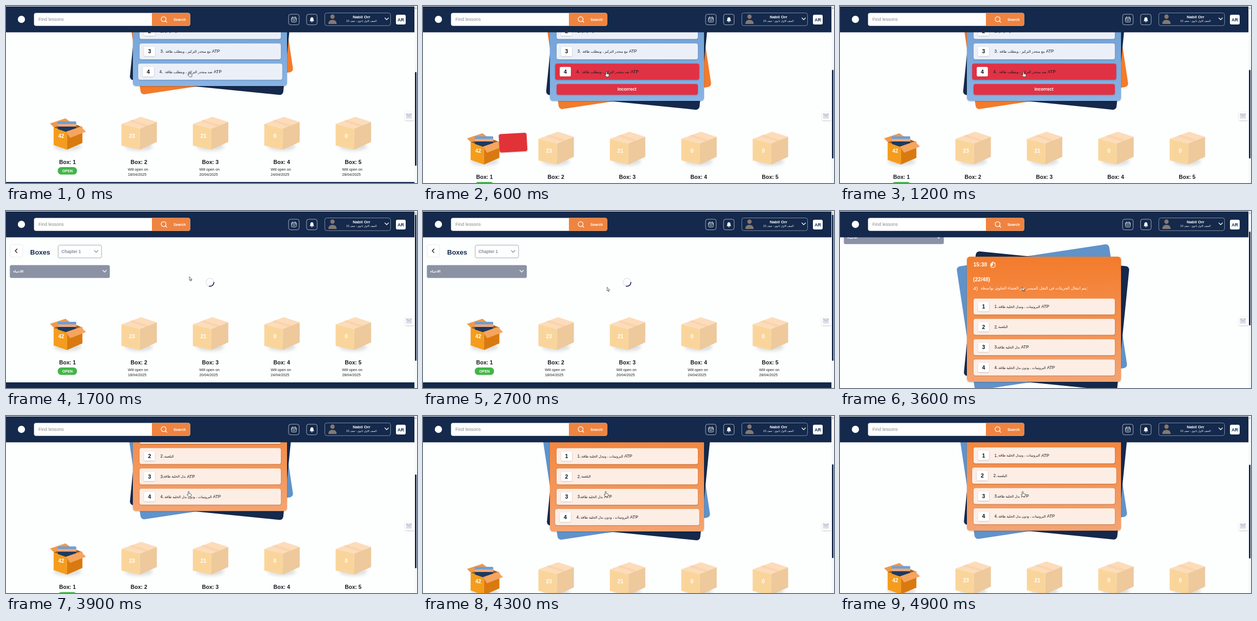
An HTML page for the animation above (5 s loop, 800 by 345 pixels).

```html
<!DOCTYPE html>
<html lang="en">
<head>
<meta charset="utf-8">
<title>Question boxes</title>
<style>
html, body { margin: 0; width: 100%; height: 100%; overflow: hidden; background: #fdfefe; }
svg { display: block; width: 800px; height: 345px; font-family: "Liberation Sans", Arial, "DejaVu Sans", sans-serif; }
.b { font-weight: bold; }
.m { text-anchor: middle; }
.line { fill: none; stroke-linecap: round; stroke-linejoin: round; }
</style>
</head>
<body>
<svg id="stage" viewBox="0 0 800 345"></svg>
<script>
const NAVY = '#14294b', ORANGE = '#f37b2b', BLUE = '#6093ca', RED = '#e03145';
const LOOP = 5000, LOAD = 1400, READY = 3150, ANSWER = 250;
const TOP = 155, CARD_H = 244, EXTRA = 29;
const $ = id => document.getElementById(id);

const rect = (x, y, w, h, r, fill, more = '') =>
  `<rect x="${x}" y="${y}" width="${w}" height="${h}" rx="${r}" fill="${fill}" ${more}/>`;
const text = (x, y, size, fill, str, cls = '', more = '') =>
  `<text x="${x}" y="${y}" font-size="${size}" fill="${fill}" class="${cls}" ${more}>${str}</text>`;
const line = (d, stroke, w = 1, more = '') =>
  `<path class="line" d="${d}" stroke="${stroke}" stroke-width="${w}" ${more}/>`;
const poly = (points, fill) => `<polygon points="${points}" fill="${fill}"/>`;
const group = (id, body, more = '') => `<g id="${id}" ${more}>${body}</g>`;
const gradient = (id, a, b) => `<linearGradient id="${id}" x1="0" y1="0" x2="0" y2="1">
  <stop stop-color="${a}"/><stop offset="1" stop-color="${b}"/></linearGradient>`;
const chevron = (x, y, color) => line(`M${x - 3.5} ${y - 2}l3.5 3.5l3.5-3.5`, color, 1.3);

// One answer, drawn around its own centre so that it can grow on hover
function row(id, i, [str, end, atp], fill, ink) {
  const x = end - 397.5;
  return `<g transform="translate(397.5 ${252.2 + i * 39.6})">` + group(`${id}r${i}`,
    rect(-137.5, -15.5, 275, 31, 4, fill, 'filter="url(#soft)"') +
    rect(-128.8, -9, 21.3, 18, 2.5, '#fff', 'filter="url(#soft)"') +
    text(-118.2, 3.8, 10.5, '#111', i + 1, 'b m') +
    text(-97, 2.8, 8.2, ink, `${i + 1}.`) +
    text(x, 2.6, 6.6, ink, str, '', 'text-anchor="end"') +
    (atp ? text(x + 2.5, 2.8, 8.2, ink, 'ATP') : '')) + '</g>';
}

function stack(id, main, back, tint, rows, extra, body = '') {
  const h = CARD_H + extra, cy = TOP + h / 2;
  const sheet = (dx, dy, turn, fill) => rect(247, TOP, 300, h, 7, fill,
    `transform="translate(${dx} ${dy}) rotate(${turn} 397 ${cy})"`);
  return group(id,
    sheet(-4, -4, -8.6, back) + sheet(5, 3.5, 5.75, NAVY) +
    rect(247, TOP, 300, h, 6, main, 'filter="url(#soft)"') + body +
    rows.map((r, i) => row(id, i, r, extra && i == 3 ? RED : tint, '#17171c')).join('') +
    (extra ? rect(260, 395, 275, 21, 4, RED, 'filter="url(#soft)"') +
      text(397, 408.2, 8.6, '#fff', 'Incorrect', 'b m') : ''));
}

const first = [
  ['مع منحدر التركيز', 357],
  ['ضد منحدر التركيز', 357],
  ['مع منحدر التركيز ، ويتطلب طاقة', 398.5, 1],
  ['ضد منحدر التركيز ، ويتطلب طاقة', 401.5, 1]
];
const second = [
  ['البروتينات ، وتبذل الخلية طاقة', 389.5, 1],
  ['البلعمة', 326.5],
  ['بذل الخلية طاقة', 350, 1],
  ['البروتينات ، ودون بذل الخلية طاقة', 400.5, 1]
];

const question =
  text(259.5, 174, 10.5, '#fff', '15:38', 'b') +
  `<circle cx="297.5" cy="171.5" r="4.6" fill="none" stroke="#fff" stroke-width="1.2"/>
   <path d="M297.5 171.5V167.5A4 4 0 0 0 294.5 174.2Z" fill="#fff"/>` +
  line('M296 165.5h3M301 167l1 1', '#fff', 1.2) +
  text(259, 203, 10.5, '#fff', '(22/48)', 'b') +
  text(259.5, 219.6, 9.7, '#fff', '4)') +
  text(480, 219.4, 7.8, '#fff', 'يتم انتقال الجزيئات في النقل الميسر عبر الغشاء الخلوي بواسطة', '', 'text-anchor="end"') +
  text(480.5, 219.6, 9.7, '#fff', ':');

const openBox =
  poly('-34,-24 -4,-34 7,-26 -25,-15', '#ee9a4e') +
  poly('-27,-16 3,-27 29,-17 -1,-8', '#a85d12') +
  rect(-19, -28, 36, 20, 1.5, '#6d9fd6') +
  rect(-19, -23, 36, 15, 0, '#f5a877') +
  rect(-19, -18, 36, 14, 0, '#1d3a60') +
  poly('-27,-16 -1,-7 -1,27 -27,18', '#f59c1c') +
  poly('-1,-7 29,-17 29,14 -1,27', '#d97a10') +
  poly('-3,-8 26,-18 36,-8 5,4', '#f6a55f');

const closedBox =
  poly('-34,-23 4,-37 35,-27 2,-14', '#fcdcba') +
  poly('-34,-23 2,-14 2,27 -34,19', '#fad59b') +
  poly('2,-14 35,-27 35,12 2,27', '#edc99c') +
  poly('-19,-28.5 -13,-31 19,-20.5 13,-18', '#fbd3ab');

function box(i, count, date) {
  return `<g transform="translate(${119.7 + i * 139} 0)">
    <ellipse cx="0" cy="21" rx="27" ry="8" opacity=".12" filter="url(#blur)"/>` +
    (i ? closedBox : openBox) +
    text(i ? -13.4 : -12.3, 3.8, 10.3, '#fff', count, 'b m') +
    text(0, 54.6, 10.6, '#17171f', `Box: ${i + 1}`, 'b m') +
    (i ? text(-21.5, 68, 7.2, '#222', 'Will open on') + text(-21.5, 78.3, 7.2, '#222', date)
       : rect(-19, 61, 37.5, 14.5, 6.5, '#43b549') + text(0, 70.8, 7.2, '#fff', 'OPEN', 'b m')) + '</g>';
}
const boxes = [[42], [23, '18/04/2025'], [21, '20/04/2025'], [0, '24/04/2025'], [0, '28/04/2025']];

const toolbar =
  rect(8, 65.5, 24.5, 24.5, 4, '#fff', 'stroke="#e3e5ea" stroke-width=".8"') +
  line('M21.5 74l-3.5 3.7l3.5 3.7', '#111', 1.3) +
  text(47, 84.6, 13, NAVY, 'Boxes', 'b') +
  rect(101.5, 66.5, 84.5, 25, 3, '#fff', 'stroke="#8b93a5" stroke-width=".8"') +
  text(108, 81.6, 8.2, '#858c9c', 'Chapter 1', 'b') + chevron(175.5, 79, '#858c9c') +
  rect(7.5, 105.5, 194.5, 25, 3, '#8a92a4') +
  text(14, 120, 6.4, '#fff', 'الاحياء', 'b') + chevron(192, 117.5, '#fff');

const header =
  rect(0, 0, 800, 1, 0, '#f4f5f7') + rect(0, 1, 795, 50.3, 0, NAVY) +
  '<circle cx="30" cy="26" r="7" fill="#fff"/>' +
  rect(54.5, 13.5, 304, 25.3, 4, '#fff') +
  `<path d="M284 13.5h70.5a4 4 0 0 1 4 4v17.3a4 4 0 0 1-4 4H284z" fill="#ef8440"/>
   <circle cx="306.8" cy="25.6" r="4.8" fill="none" stroke="#fff" stroke-width="1.2"/>` +
  line('M310.4 29.2l2.6 2.6', '#fff', 1.3) +
  text(63, 29.4, 8.8, '#85888f', 'Find lessons') +
  text(326, 28.6, 7.2, '#fff', 'Search', 'b') +
  [550, 585].map(x => rect(x, 16, 20.7, 20.7, 4, 'none', 'stroke="#c9d0dc" stroke-width=".8"')).join('') +
  rect(555.7, 22.3, 9.4, 8.8, 1.6, 'none', 'stroke="#fff" stroke-width=".9"') +
  line('M555.7 25h9.4M558 21v2M563 21v2M558 28h4.5', '#fff', .9) +
  '<path d="M591 29.5q1.4-1.2 1.4-4a3 3.4 0 0 1 6 0q0 2.800 1.400 4zM594 30.300h2.800a1.400 1.400 0 0 1-2.800 0z" fill="#fff"/>' +
  rect(620.5, 13.5, 128, 24.8, 4, 'none', 'stroke="#9ba6b8" stroke-width=".8"') +
  '<circle cx="635.500" cy="20.800" r="4.200" fill="#857873"/><path d="M627.500 35q0-8 8-8t8 8z" fill="#857873"/>' +
  text(692, 23.6, 8, '#fff', 'Nabil Orr', 'b m') +
  text(692, 31.2, 5.2, '#fff', 'الصف الاول ثانوي - صف 10', 'm', 'direction="rtl"') +
  chevron(741, 25.3, '#fff') +
  rect(759, 17, 19, 19, 3, '#fff') + text(768.5, 29.6, 8.6, NAVY, 'AR', 'b m');

const mail =
  rect(776.5, 206, 18.5, 17, 3, '#fff', 'filter="url(#soft)"') +
  rect(778.5, 209, 11.5, 10.5, 1, '#dcdde9') + line('M779 210l5.200 4.500l5.200-4.500', '#9a9bb5', .8);

const hand = `<path d="M-1 1.500V-4q0-1 1-1t1 1v3.200l3.300.8q.9.300.8 1.300l-.6 3.700H.2L-2.800 2q-.4-1 .4-1.100z"
  fill="#fff" stroke="#222" stroke-width=".7"/>`;
const arrow = '<path d="M0 0v7.300l1.700-1.500l1.200 2.700l1.100-.5l-1.200-2.600h2.300z" fill="#fff" stroke="#222" stroke-width=".7"/>';

$('stage').innerHTML = `<defs>
  ${gradient('warm', '#f37b2b', '#f4a472')}${gradient('cool', '#6093ca', '#88b3e4')}
  <filter id="soft" x="-10%" y="-20%" width="120%" height="150%">
    <feDropShadow dx="0" dy=".8" stdDeviation="1" flood-opacity=".25"/></filter>
  <filter id="blur" x="-50%" y="-100%" width="200%" height="300%"><feGaussianBlur stdDeviation="3"/></filter>
  </defs>` +
  group('page', toolbar +
    stack('q1', 'url(#cool)', ORANGE, '#ebf0f8', first, 0) +
    stack('q1x', 'url(#cool)', ORANGE, '#ebf0f8', first, EXTRA) +
    stack('q2', 'url(#warm)', BLUE, '#fdeee5', second, 0, question)) +
  group('wait', `<circle cx="397" cy="139" r="7.700" fill="none" stroke="#dcdde3" stroke-width="1.100"/>
    ${line('M404.700 139A7.700 7.700 0 0 1 395.700 146.600', '#221c57', 1.7, 'id="arc"')}`) +
  group('shelf', boxes.map(([n, d], i) => box(i, n, d)).join('') + rect(0, 90, 795, 300, 0, NAVY)) +
  group('fly', rect(-27, -18, 54, 36, 4, '#e13038', 'filter="url(#soft)"')) +
  header + mail +
  rect(795, 1, 5, 344, 0, '#f7f8fa') + poly('797.5,2.500 799,5 796,5', '#777') +
  rect(796, 7, 3, 183, 1.5, NAVY, 'id="thumb"') +
  group('hand', hand) + group('arrow', arrow);

// Eased value at t through [time, value] stops
function follow(stops, t) {
  const i = stops.findIndex(s => s[0] > t);
  if (i < 0) return stops[stops.length - 1][1];
  if (!i) return stops[0][1];
  const [a, from] = stops[i - 1], [b, to] = stops[i], p = (t - a) / (b - a);
  return from + (to - from) * p * p * (3 - 2 * p);
}
const scrolling = [[3200, 0], [3600, 66], [3950, 222], [4100, 222], [4300, 174],
  [4500, 142], [4700, 142], [4900, 175.5], [5000, 185]];
const pointerY = [[1900, 128], [2500, 148.5]];

const show = (id, on) => $(id).setAttribute('display', on ? 'inline' : 'none');
const move = (id, x, y, more = '') => $(id).setAttribute('transform', `translate(${x} ${y}) ${more}`);
const hover = (id, i, on) => $(`${id}r${i}`).setAttribute('transform', `scale(${on ? 1.02 : 1})`);

function draw(t) {
  const loading = t >= LOAD && t < READY, fresh = t >= READY;
  const wrong = t >= ANSWER && t < LOAD;
  const scroll = t < LOAD ? 243 : loading ? 0 : follow(scrolling, t);
  const bottom = loading ? 147 : TOP + CARD_H + (wrong ? EXTRA : 0);

  show('q1', t < ANSWER);
  show('q1x', wrong);
  show('q2', fresh);
  show('wait', loading);
  move('page', 0, -scroll);
  move('shelf', 0, bottom + 97 - scroll);
  $('arc').setAttribute('transform', `rotate(${(t - 1700) * .36} 397 139)`);

  hover('q1', 3, true);
  hover('q1x', 3, true);
  hover('q2', 3, t > 4020 && t < 4420);
  hover('q2', 1, t > 4580);

  const q = Math.min(1, Math.max(0, (t - 400) / 500)), p = 1 - (1 - q) ** 3;
  show('fly', q > 0 && q < 1);
  move('fly', 397 - 282 * p, 150 + 148 * p, `rotate(${-4 * p}) scale(${(150 - 122 * p) / 54})`);

  const size = loading ? 285 : wrong ? 173 : 183;
  $('thumb').setAttribute('y', 7 + scroll * (wrong ? .482 : .5));
  $('thumb').setAttribute('height', size);

  const pointing = t < LOAD || t > 3800;
  show('hand', pointing);
  show('arrow', !pointing);
  move('hand', t < LOAD ? 357 : 355.5, t < LOAD ? 133 : 152);
  move('arrow', follow([[1900, 357], [2500, 358.3], [3150, 358.3], [3500, 355]], t), follow(pointerY, t));
}

const start = performance.now();
function frame(now) {
  draw(Math.max(0, now - start) % LOOP);
  requestAnimationFrame(frame);
}
draw(0);
requestAnimationFrame(frame);
</script>
</body>
</html>
```
